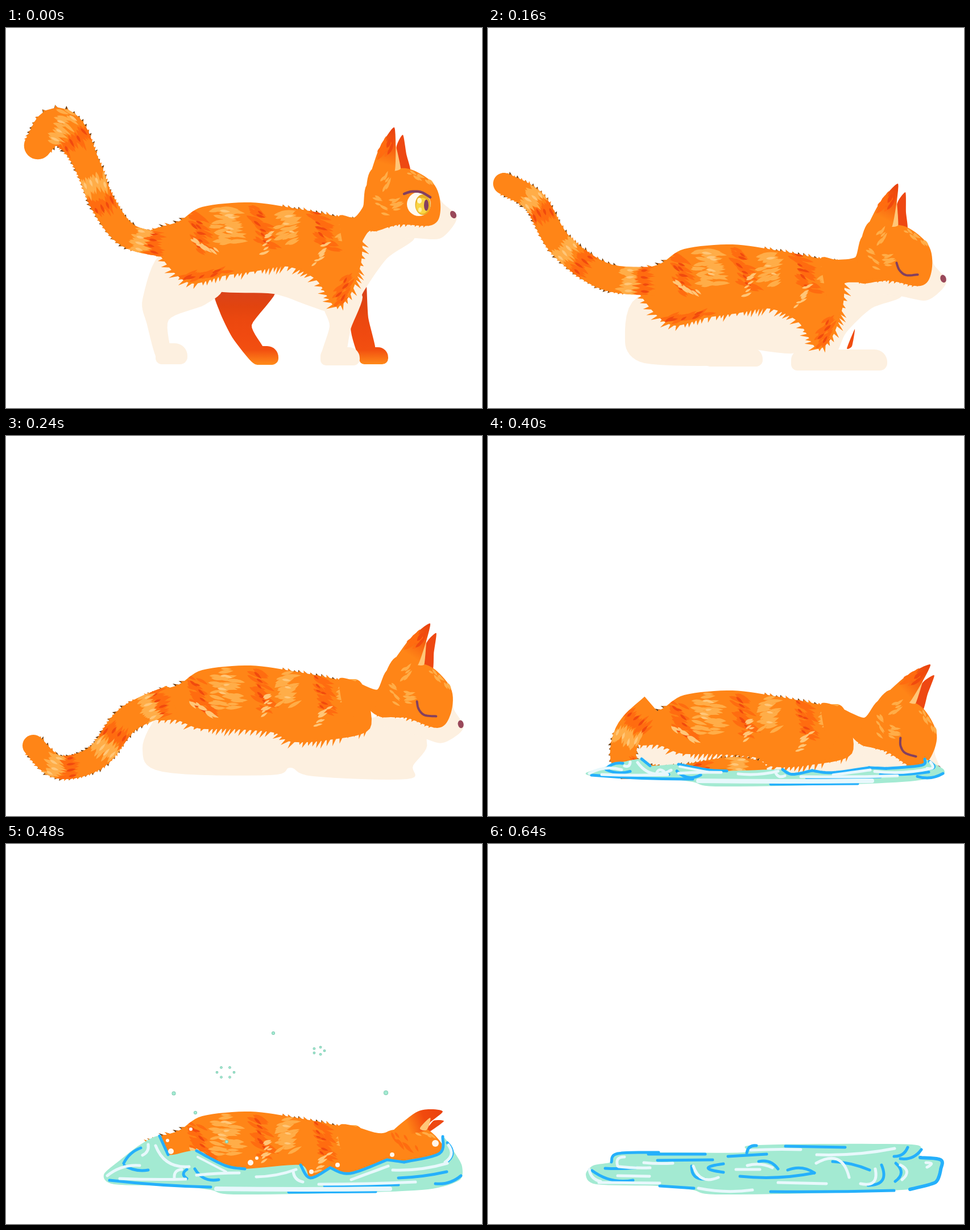
These frames come from a looping animation (837x669 px, 720 ms). An HTML page with a canvas:

```html
<!DOCTYPE html>
<html lang="en">
<head>
<meta charset="utf-8">
<title>Melting cat</title>
<style>
html, body { margin: 0; width: 100%; height: 100%; overflow: hidden; background: #fff; }
canvas { display: block; }
</style>
</head>
<body>
<canvas id="stage" width="837" height="669"></canvas>
<script>
const ctx = document.getElementById('stage').getContext('2d');
const STEP = 80;
const C = {
  orange: '#ff8517', light: '#ffad48', pale: '#ffc678', dark: '#ff6c10', deep: '#f14a0e',
  cream: '#fdf0e0', plum: '#84405f', nose: '#99485a', hair: '#6b3d12',
  mint: '#a3ead2', blue: '#25b0fb', foam: '#e8f8fc'
};

let seed = 1;
const rand = () => (seed = seed * 16807 % 2147483647) / 2147483647;
const spread = r => (rand() * 2 - 1) * r;

// Samples a spline through flat x, y points; low pull keeps corners sharp
function smooth(p, open = false, pull = .5) {
  const n = p.length / 2, out = [];
  const get = (i, o) => p[2 * (open ? Math.max(0, Math.min(n - 1, i)) : (i + n) % n) + o];
  for (let i = 0; i < (open ? n - 1 : n); i++) {
    for (let t = 0; t < 1; t += .125) {
      for (const o of [0, 1]) {
        const b = get(i, o), c = get(i + 1, o);
        const m = pull * (c - get(i - 1, o)), k = pull * (get(i + 2, o) - b);
        out.push(b + t * (m + t * (3 * (c - b) - 2 * m - k + t * (2 * (b - c) + m + k))));
      }
    }
  }
  if (open) out.push(...p.slice(-2));
  return out;
}
function trace(p) {
  const path = new Path2D();
  for (let i = 0; i < p.length; i += 2) path.lineTo(p[i], p[i + 1]);
  return path;
}
function shape(p, color, pull) {
  ctx.fillStyle = color;
  ctx.fill(trace(smooth(p, false, pull)));
}
function pen(color, width) {
  ctx.strokeStyle = color;
  ctx.lineWidth = width;
  ctx.lineCap = ctx.lineJoin = 'round';
}
function line(p, color, width) {
  pen(color, width);
  ctx.stroke(trace(smooth(p, true)));
}
function oval(x, y, rx, ry, color, turn = 0) {
  ctx.fillStyle = color;
  ctx.beginPath();
  ctx.ellipse(x, y, rx, ry, turn, 0, 7);
  ctx.fill();
}
function fade(x0, y0, x1, y1, ...colors) {
  const g = ctx.createLinearGradient(x0, y0, x1, y1);
  colors.forEach((color, i) => g.addColorStop(i / (colors.length - 1), color));
  return g;
}
function leaf(x, y, len, w, turn, color) {
  ctx.save();
  ctx.translate(x, y);
  ctx.rotate(turn);
  ctx.fillStyle = color;
  ctx.beginPath();
  ctx.moveTo(-len / 2, 0);
  ctx.quadraticCurveTo(-len / 6, -w, len / 2, 0);
  ctx.quadraticCurveTo(-len / 6, w, -len / 2, 0);
  ctx.fill();
  ctx.restore();
}
// Leaves scattered along a segment
function patch(x, y, dx, dy, r, n, color, len, turn) {
  for (let i = 0; i < n; i++) {
    const u = (i + rand()) / n, k = .7 + rand() * .6;
    leaf(x + dx * u + spread(r), y + dy * u + spread(4), len * k, 2 + len * .15 * k, turn + spread(.3), color);
  }
}
// Spikes of fur on the outer side of a clockwise edge
function fringe(p, len, lean, gap, color) {
  ctx.fillStyle = color;
  let gone = 0;
  for (let i = 0; i + 3 < p.length; i += 2) {
    const dx = p[i + 2] - p[i], dy = p[i + 3] - p[i + 1], d = Math.hypot(dx, dy) || 1;
    if ((gone += d) < gap) continue;
    gone = 0;
    const tx = dx / d * gap * .6, ty = dy / d * gap * .6, l = len * (.4 + rand() * .8);
    const nx = dy / d, ny = -dx / d, x = p[i] - nx * 3, y = p[i + 1] - ny * 3;
    ctx.beginPath();
    ctx.moveTo(x - tx, y - ty);
    ctx.lineTo(p[i] + l * (nx - ny * lean), p[i + 1] + l * (ny + nx * lean));
    ctx.lineTo(x + tx, y + ty);
    ctx.fill();
  }
}

const BACK = [247, 361, 303, 341, 345, 315, 430, 307, 510, 318, 585, 332, 625, 338];
const STAND = [627, 375, 623, 420, 605, 470, 578, 490, 545, 443, 495, 420, 440, 428, 385, 436,
  330, 450, 298, 433, 270, 399];
const LIE = [640, 418, 560, 439, 500, 441, 470, 425, 400, 419, 340, 418, 300, 403, 262, 401];

// Feet are x, floor, width, height
const still = {
  dy: 0, nose: [787, 329], turn: 0, low: STAND, eye: 'open',
  far: [[369, 460, 376, 500, 398, 545, 435, 590, 455, 568, 432, 523, 474, 462],
    [630, 455, 606, 527, 624, 586, 650, 570, 637, 510, 634, 455]],
  farFeet: [[432, 593, 47, 33], [621, 592, 51, 30]],
  legs: [[275, 398, 240, 478, 248, 522, 266, 584, 290, 578, 286, 514, 350, 487, 378, 455],
    [560, 485, 569, 525, 554, 582, 594, 580, 606, 530, 626, 470]],
  feet: [[263, 592, 56, 37], [553, 594, 69, 32]],
  tail: [285, 383, 214, 365, 170, 308, 146, 248, 117, 192, 85, 172, 56, 207], wide: [42, 46, 20]
};
const step = {
  dy: 25, nose: [788, 354], turn: .025, low: STAND, eye: 'half',
  far: [[370, 486, 382, 543, 435, 590, 455, 568, 442, 545, 475, 488],
    [645, 460, 614, 538, 662, 575, 624, 540]],
  farFeet: [[432, 593, 47, 33], [650, 597, 43, 30]],
  legs: [[270, 428, 237, 508, 245, 540, 268, 585, 290, 578, 286, 541, 350, 510, 378, 480],
    [538, 505, 535, 540, 570, 570, 632, 597, 662, 566, 614, 538, 632, 485]],
  feet: [[263, 591, 56, 37], [622, 599, 63, 34]],
  tail: [285, 398, 190, 388, 105, 333, 66, 245, 82, 165], wide: [48, 40, 0]
};
const crouch = {
  dy: 74, nose: [801, 442], turn: .15, low: STAND, eye: 'shut',
  far: [[445, 562, 463, 559, 457, 568], [645, 530, 631, 564, 640, 560]], farFeet: [],
  legs: [[276, 470, 241, 552, 275, 590, 420, 593, 440, 564, 540, 572, 540, 520]],
  feet: [[380, 596, 103, 33], [533, 603, 169, 37]],
  tail: [295, 446, 205, 437, 127, 381, 82, 306, 28, 274], wide: [50, 38, 0]
};
const sink = {
  dy: 97, nose: [800, 508], turn: .3, low: LIE, eye: 'shut',
  coat: [268, 490, 240, 550, 275, 591, 465, 597, 500, 584, 540, 599, 705, 604, 716, 580, 740, 540, 690, 500, 300, 480],
  tail: [292, 463, 215, 498, 160, 565, 92, 583, 48, 545], wide: [50, 38, 0]
};
const sleep = {
  dy: 119, nose: [796, 570], turn: .436, low: LIE, eye: 'shut',
  coat: [280, 515, 262, 550, 290, 592, 490, 597, 640, 602, 724, 604, 735, 588, 760, 570, 700, 530, 400, 515],
  tail: [292, 478, 247, 522, 243, 580, 310, 602, 425, 583, 474, 588], wide: [51, 33, 0],
  bands: [.1, .2, .38, .56, .73, .9]
};
const POSES = [still, step, crouch, sink, sleep,
  { ...sleep, dy: 141, nose: [792, 588], turn: .52, ebb: 38 },
  { dy: 164, low: LIE, ebb: 0 },
  { dy: 188, low: LIE, ebb: 16 }];

function placer({ nose, turn }) {
  const cos = Math.cos(turn), sin = Math.sin(turn);
  return (x, y) => [nose[0] + (x - 787) * cos - (y - 329) * sin, nose[1] + (x - 787) * sin + (y - 329) * cos];
}

function foot([x, y, w, h], color) {
  ctx.fillStyle = color;
  ctx.beginPath();
  ctx.roundRect(x, y - h, w, h, [h * .5, h * .6, h * .35, h * .3]);
  ctx.fill();
}

function under(pose) {
  if (pose.coat) return shape(pose.coat, C.cream);
  const { dy } = pose, h = placer(pose);
  const red = fade(0, 465, 0, 592, '#da431a', '#e2440f', '#ec480f', '#f04a10', '#f24f10', '#ff8a1a');
  pose.far.forEach(p => shape(p, red, .3));
  pose.farFeet.forEach(f => foot(f, red));
  const [jx, jy] = h(718, 371);
  shape([275, 398 + dy, 300, 440 + dy, 372, 464 + dy, 470, 468 + dy, 530, 488 + dy, 568, 500 + dy, 610, 500 + dy,
    630, 462 + dy, (632 + jx) / 2 - 5, (450 + dy + jy) / 2 - 5, jx, jy, ...h(700, 340),
    620, 350 + dy, 300, 380 + dy], C.cream, .4);
  pose.legs.forEach(p => shape(p, C.cream, .4));
  pose.feet.forEach(f => foot(f, C.cream));
}

function body({ dy, low }) {
  ctx.save();
  ctx.translate(0, dy);
  const edge = smooth([...BACK, ...low], false, .45), top = smooth(BACK, true, .45), rump = top.slice(0, 24);
  seed = 11;
  fringe(rump, 8, -1.2, 7, C.hair);
  fringe(top.slice(60), 4, -1.5, 9, C.hair);
  ctx.fillStyle = C.orange;
  ctx.fill(trace(edge));
  fringe(rump, 7, -1.2, 7, C.orange);
  fringe(top.slice(60), 4, -1.5, 8, C.orange);
  fringe(smooth(low, true, .45), 11, .7, 7, C.orange);
  ctx.clip(trace(edge));
  for (let i = 0; i < 6; i++) {
    const x = 333 + 54 * i, y = i ? 314 + 3 * i : 330;
    if (i % 2) {
      const r = 24 - 3 * i;
      patch(x, y, 4 - i, 70 - 6 * i, r, r * 1.7, C.light, 27, i > 1 ? -.3 : .05);
      patch(x, y + 3, 3, 38, r / 2, 6 - i, C.pale, 15, 0);
    } else {
      patch(x, y - 3, 20, 68, 13, 28, C.dark, 25, .45);
      patch(x, y, 12, 58, 6, 6, C.deep, 14, .5);
    }
  }
  patch(305, 440, 80, -10, 10, 24, C.dark, 25, -.4);
  patch(310, 440, 70, -10, 7, 5, C.deep, 16, -.4);
  patch(600, 440, -17, 45, 10, 24, C.dark, 22, -.8);
  patch(600, 440, -14, 38, 6, 5, C.deep, 14, -.8);
  patch(325, 372, 44, 24, 5, 10, C.pale, 17, .6);
  patch(463, 356, -6, 41, 5, 9, C.pale, 14, -.5);
  patch(567, 377, -22, 39, 5, 9, C.pale, 15, -.4);
  ctx.restore();
}

function tail({ tail: p, wide: [from, to, bulge], bands = [.07, .14, .4, .5, .74, .83] }) {
  const spine = smooth(p, true), reach = [0];
  for (let i = 2; i < spine.length; i += 2) {
    reach.push(reach[i / 2 - 1] + Math.hypot(spine[i] - spine[i - 2], spine[i + 1] - spine[i - 1]));
  }
  const total = reach[reach.length - 1];
  const spot = u => {
    const s = Math.max(0, Math.min(1, u)) * total;
    const i = Math.max(1, reach.findIndex(r => r >= s - 1e-6)), t = (s - reach[i - 1]) / (reach[i] - reach[i - 1]);
    return [0, 1].map(o => spine[2 * i - 2 + o] * (1 - t) + spine[2 * i + o] * t);
  };
  const frame = u => {
    const [x, y] = spot(u), [a, b] = spot(u - .02), [c, d] = spot(u + .02);
    const w = from + (to - from) * u + bulge * Math.exp(-(((u - .83) / .12) ** 2));
    return { x, y, w, turn: Math.atan2(d - b, c - a) };
  };
  const left = [], right = [], tip = [];
  for (let i = 0; i <= 50; i++) {
    const { x, y, w, turn } = frame(i / 50), sx = Math.sin(turn) * w / 2, sy = Math.cos(turn) * w / 2;
    left.push(x + sx, y - sy);
    right.unshift(x - sx, y + sy);
  }
  const end = frame(1);
  for (let a = -1.4; a < 1.5; a += .2) {
    tip.push(end.x + Math.cos(end.turn + a) * end.w / 2, end.y + Math.sin(end.turn + a) * end.w / 2);
  }
  const edge = trace([...left, ...tip, ...right]);
  const fur = (len, gap, color) => {
    fringe(left.slice(16), len, 1.4, gap, color);
    fringe(right.slice(0, -18), len, -1.4, gap, color);
  };
  seed = 5;
  fur(4, 8, C.hair);
  ctx.fillStyle = C.orange;
  ctx.fill(edge);
  fur(3, 6, C.orange);
  ctx.save();
  ctx.clip(edge);
  const band = (at, n, r, color, len, w) => {
    for (let j = 0; j < n; j++) {
      const f = frame(at + spread(r)), v = ((j + .5) / n - .5) * f.w;
      leaf(f.x + Math.sin(f.turn) * v, f.y - Math.cos(f.turn) * v, len * (.8 + rand() * .5), w,
        f.turn + Math.PI + spread(.15), color);
    }
  };
  bands.forEach((u, i) => {
    band(u, 14, .022, i % 2 ? C.light : C.dark, 29, 6);
    band(u, 4, .02, i % 2 ? C.pale : C.deep, 14, 4.5);
  });
  ctx.restore();
}

function eye(state) {
  if (state === 'shut') return line([701, 313, 708, 325, 721, 332, 741, 328], C.plum, 4);
  const half = state === 'half';
  ctx.save();
  if (half) {
    ctx.beginPath();
    ctx.rect(690, 314, 70, 30);
    ctx.clip();
  }
  oval(726, 310, 21, 21, '#fffaf0');
  oval(733, 311, 13.5, 18, '#e9ae25');
  oval(732, 313, 11, 14, '#f9d544');
  oval(739, 312, 4, 10, C.plum);
  oval(727, 304, 4, 5, '#fff8cc');
  oval(728, 320, 3, 4, '#fff0a0');
  ctx.restore();
  if (half) line([706, 314, 745, 314], C.plum, 3);
  else line([700, 292, 713, 288, 730, 289, 746, 298], C.plum, 4.5);
}

function head(pose) {
  const { dy, nose, turn } = pose, h = placer(pose);
  shape([585, 332 + dy, 612, 334 + dy, ...h(628, 314), ...h(637, 275), ...h(720, 300), ...h(690, 345),
    ...h(640, 357), 626, 376 + dy, 600, 410 + dy], C.orange, .3);
  ctx.save();
  ctx.translate(...nose);
  ctx.rotate(turn);
  ctx.translate(-787, -329);
  shape([684, 248, 687, 207, 698, 188, 704, 222, 711, 253], '#ee4812', .3);
  shape([755, 290, 768, 308, 792, 330, 786, 349, 762, 371, 715, 370, 660, 372, 640, 360, 740, 335], C.cream, .4);
  const face = [633, 300, 642, 250, 680, 247, 715, 250, 754, 277, 764, 320, 749, 347, 690, 346, 640, 356];
  seed = 21;
  shape(face, C.orange);
  fringe(smooth(face.slice(-6), true), 5, .8, 7, C.orange);
  shape([682, 195, 694, 247, 678, 250], C.pale, .2);
  shape([637, 275, 655, 215, 683, 175, 684, 250, 665, 262], fade(686, 178, 668, 240, '#e8400e', '#f65f10', C.orange), .3);
  patch(673, 200, -12, 25, 8, 12, C.dark, 22, -1.1);
  patch(677, 192, -4, 22, 5, 5, C.deep, 22, -1.15);
  patch(672, 255, -8, 25, 7, 7, C.light, 16, -.9);
  patch(712, 256, 36, 17, 5, 9, C.light, 13, .5);
  patch(683, 302, 12, 16, 7, 8, C.light, 17, -.3);
  patch(652, 300, 16, 24, 5, 6, C.light, 15, .4);
  eye(pose.eye);
  oval(786.5, 328.5, 5, 7, C.nose, -.5);
  ctx.restore();
}

function meltedHead(dy) {
  ctx.save();
  ctx.translate(0, dy);
  shape([738, 505, 752, 487, 770, 488, 744, 507], '#ee4812', .3);
  shape([585, 496, 655, 509, 682, 503, 735, 500, 768, 530, 768, 552, 690, 570, 610, 575], C.orange);
  shape([678, 508, 720, 473, 745, 467, 768, 471, 746, 490, 740, 503, 710, 511],
    fade(766, 470, 705, 495, '#ea420e', C.deep, C.orange), .4);
  shape([746, 482, 728, 500, 740, 503], C.pale);
  seed = 31;
  patch(690, 515, 25, 25, 14, 12, C.dark, 18, .9);
  patch(728, 508, 24, 8, 3, 5, C.light, 12, .4);
  ctx.restore();
}

// Lower rim of the puddle runs right to left, the upper edges left to right
const RIM = [742, 608, 610, 614, 400, 617, 360, 609, 300, 602, 190, 599];
const RISE = [172, 582, 200, 557, 235, 530, 270, 514, 285, 547, 335, 540, 385, 566, 420, 572, 518, 565,
  535, 588, 570, 570, 605, 580, 670, 556, 700, 560, 762, 545, 768, 515, 790, 545, 802, 568, 797, 592];
const FLAT = [172, 582, 185, 566, 217, 560, 228, 545, 300, 543, 450, 543, 458, 531, 600, 528, 745, 529,
  762, 538, 760, 552, 796, 556, 796, 573, 790, 592, 778, 599];

const part = (p, from, to) => p.slice(2 * from, 2 * to);
// Strokes given by both ends and a sideways bend
function bows(color, width, list, place = y => y) {
  pen(color, width);
  list.forEach(([x0, y0, x1, y1, bend]) => {
    const a = place(y0), b = place(y1), d = Math.hypot(x1 - x0, b - a);
    ctx.beginPath();
    ctx.moveTo(x0, a);
    ctx.quadraticCurveTo((x0 + x1) / 2 + (b - a) / d * bend * 2, (a + b) / 2 - (x1 - x0) / d * bend * 2, x1, b);
    ctx.stroke();
  });
}
function drop(x, y, r) {
  oval(x, y, r, r, '#6fbfa4');
  oval(x, y, r - .7, r - .7, C.mint);
}
function ring(x, y, r, n) {
  for (let i = 0; i < n; i++) drop(x + Math.cos(i * 6.28 / n) * r, y + Math.sin(i * 6.28 / n) * r * .65, 2.3);
}

function splash(ebb) {
  const low = y => y + ebb * Math.max(0, (600 - y) / 60);
  const edge = RISE.map((v, i) => i % 2 ? low(v) : v);
  const inner = RISE.map((v, i) => i % 2 ? low(v + 11) : v + 2);
  shape([...edge, ...RIM], C.mint, .4);
  for (const [a, b] of [[3, 5], [5, 8], [8, 11], [10, 13], [12, 14], [13, 16]]) line(part(edge, a, b), C.blue, 5);
  bows(C.blue, 5, [[237, 535, 207, 562, -4], [208, 566, 250, 574, -4], [182, 592, 360, 604, -2],
    [332, 572, 374, 591, -8], [318, 573, 318, 589, -6], [560, 602, 690, 600, 0], [755, 598, 800, 584, -5],
    [497, 613, 650, 612, 0], [776, 526, 772, 562, 11], [690, 588, 775, 577, -2]], low);
  line(part(inner, 5, 7), C.foam, 4);
  line(part(inner, 11, 13), C.foam, 5);
  bows(C.foam, 5, [[178, 584, 235, 566, 6], [200, 589, 316, 590, -1], [240, 548, 250, 529, -4],
    [263, 531, 322, 568, -13], [309, 573, 296, 588, -5], [335, 583, 410, 579, 1], [440, 586, 510, 573, -3],
    [505, 575, 522, 595, -5], [550, 599, 720, 595, -1], [680, 574, 776, 562, -4], [778, 530, 772, 560, 8]], low);
  bows(C.foam, 8, [[370, 607, 675, 607, -1]]);
  if (ebb > 30) return;
  for (const [x, y, r] of [[290, 541, 5], [284, 522, 3], [325, 502, 3], [430, 561, 5], [441, 553, 3],
    [537, 577, 4], [583, 565, 4], [679, 547, 4], [755, 527, 6]]) oval(x, low(y), r, r, '#fff5ea');
  for (const d of [[470, 333, 3], [295, 439, 3.5], [668, 438, 4], [333, 473, 3], [388, 524, 3]]) drop(...d);
  ring(550, 364, 10, 5);
  ring(386, 402, 15, 6);
}

function puddle() {
  shape([...FLAT, ...RIM], C.mint, .4);
  line(part(FLAT, 2, 5), C.blue, 5);
  line([...part(FLAT, 10, 15), ...part(RIM, 0, 1)], C.blue, 6);
  bows(C.blue, 5, [[282, 546, 382, 546, 0], [298, 557, 395, 556, 0], [422, 550, 490, 546, 0], [455, 544, 472, 531, 5],
    [523, 532, 628, 534, 0], [358, 567, 382, 590, -9], [414, 563, 414, 578, -27], [476, 559, 510, 572, 6],
    [443, 585, 574, 579, -5], [527, 574, 574, 579, 6], [606, 559, 671, 574, 3], [668, 601, 692, 565, -16],
    [717, 562, 716, 594, 10], [738, 534, 714, 550, 5], [497, 612, 714, 610, -1], [302, 602, 362, 606, 0],
    [183, 575, 255, 592, -8], [206, 571, 260, 570, -1], [725, 554, 762, 538, -6]]);
  bows(C.foam, 5, [[178, 573, 198, 594, -5], [240, 551, 228, 567, -7], [230, 568, 285, 570, -1],
    [274, 561, 325, 562, -1], [228, 584, 284, 585, 0], [195, 596, 302, 597, 0], [361, 567, 405, 587, -13],
    [462, 539, 550, 538, 1], [578, 547, 715, 536, -4], [456, 566, 500, 570, 4], [436, 573, 478, 573, 0],
    [577, 562, 635, 587, 21], [681, 572, 655, 598, 14], [725, 565, 728, 591, 10], [510, 596, 595, 598, 0],
    [770, 561, 772, 569, 9], [370, 606, 465, 609, -4]]);
}

function cat(pose) {
  ctx.save();
  if (pose.ebb !== undefined) {
    ctx.beginPath();
    ctx.rect(180, 0, 640, 604);
    ctx.clip();
  }
  if (pose.nose) under(pose);
  body(pose);
  if (pose.nose) {
    tail(pose);
    head(pose);
  } else meltedHead(pose.dy - 164);
  ctx.restore();
  if (pose.ebb !== undefined) splash(pose.ebb);
}

const start = performance.now();
let shown = -1;
function tick() {
  const i = Math.floor((performance.now() - start) / STEP) % (POSES.length + 1);
  if (i !== shown) {
    shown = i;
    ctx.clearRect(0, 0, 837, 669);
    if (i < POSES.length) cat(POSES[i]);
    else puddle();
  }
  requestAnimationFrame(tick);
}
tick();
</script>
</body>
</html>
```
